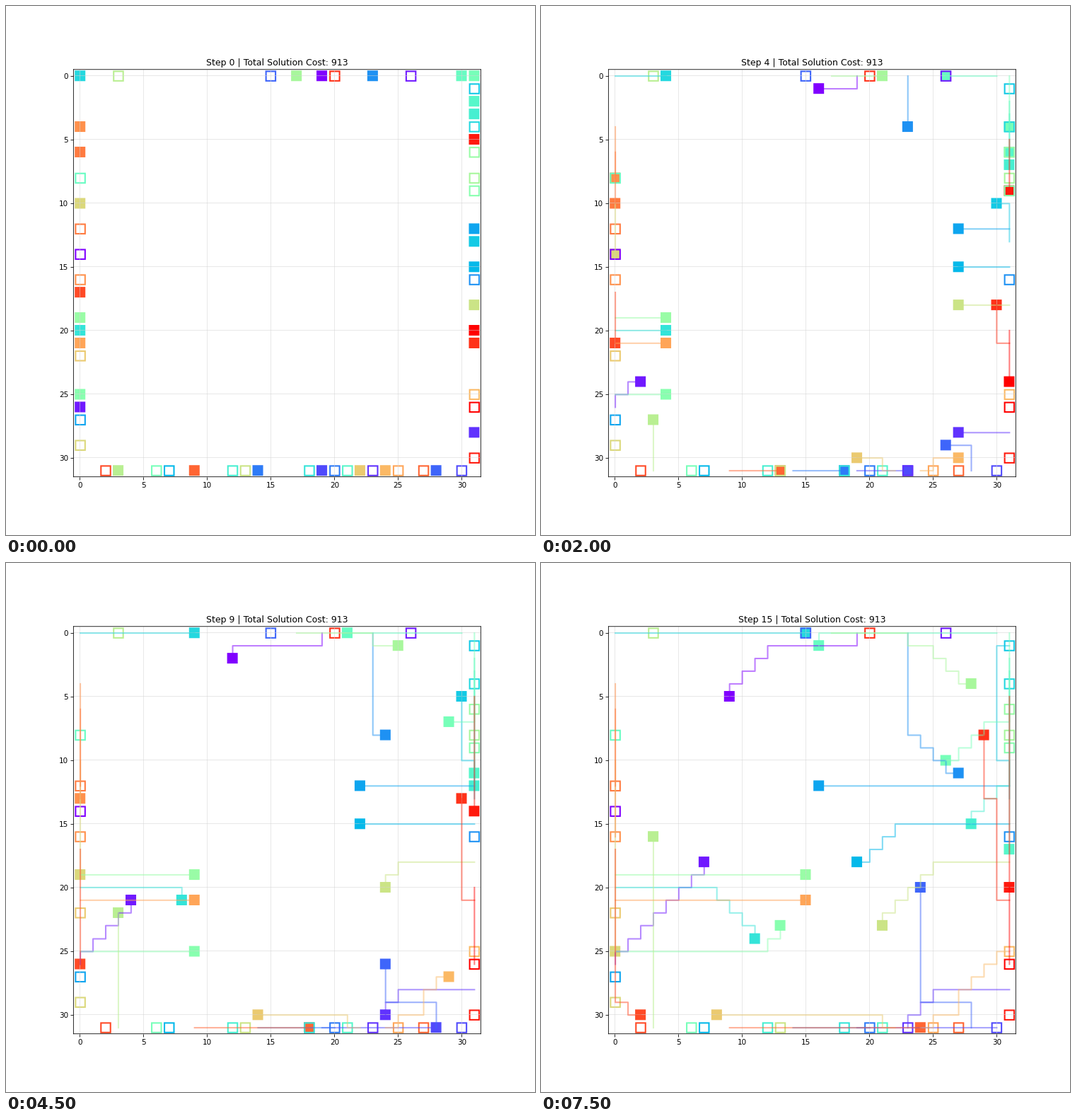
Write a matplotlib script that moves like this. It is 748 px wide and 748 px high and loops after 8000 ms.

```python
import matplotlib.pyplot as plt
import numpy as np
from matplotlib.animation import FuncAnimation
from matplotlib.patches import Rectangle

STEPS = 16
COST = 913
MOVES = {"U": (0, -1), "D": (0, 1), "L": (-1, 0), "R": (1, 0)}

# cell pitch and left/top axes edge on a 1000 unit sheet
PITCH = 770 / 32
EDGE = np.array([127.5, 120])
HALF = 0.5 / PITCH
SIDE = 18 / PITCH

# start cell, goal cell, moves
AGENTS = [
    ((19, 0), (0, 14), "D" + "L" * 7 + "DL" * 3 + "D"),
    ((0, 26), (26, 0), "UR" * 7 + "U"),
    ((31, 28), (23, 31), "L" * 6 + "DL" * 2 + "D"),
    ((19, 31), (30, 31), "R" * 11),
    ((28, 31), (15, 0), "UU" + "L" * 4 + "U" * 9),
    ((14, 31), (20, 31), "R" * 6),
    ((23, 0), (31, 16), "D" * 8 + "RD" * 3 + "R"),
    ((31, 12), (0, 27), "L" * 15),
    ((31, 15), (7, 31), "L" * 9 + "DL" * 3),
    ((31, 13), (31, 1), "UUUL" + "U" * 9 + "R"),
    ((0, 0), (31, 4), "R" * 15),
    ((0, 20), (18, 31), "R" * 8 + "DR" * 3 + "D"),
    ((31, 3), (12, 31), "D" * 9 + "LD" * 3),
    ((31, 2), (21, 31), "D" * 15),
    ((30, 0), (0, 8), "L" * 14 + "D"),
    ((31, 0), (6, 31), "D" * 7 + "LL" + "DL" * 3),
    ((0, 25), (31, 9), "R" * 12 + "URU"),
    ((0, 19), (31, 6), "R" * 15),
    ((17, 0), (31, 8), "R" * 6 + "DRR" + "DR" * 3),
    ((3, 31), (3, 0), "U" * 15),
    ((31, 18), (13, 31), "L" * 6 + "DL" * 4 + "D"),
    ((0, 10), (0, 29), "D" * 15),
    ((22, 31), (0, 22), "LU" + "L" * 13),
    ((24, 31), (31, 25), "RURRU" + "UR" * 4),
    ((0, 21), (25, 31), "R" * 15),
    ((0, 4), (0, 16), "D" * 12),
    ((0, 6), (0, 12), "D" * 6),
    ((9, 31), (27, 31), "R" * 15),
    ((0, 17), (2, 31), "D" * 12 + "RDR"),
    ((31, 21), (20, 0), "L" + "U" * 8 + "L" + "U" * 5),
    ((31, 5), (31, 30), "D" * 15),
    ((31, 20), (31, 26), "D" * 6),
]


def walk(start, moves):
    """Cells visited, one per step."""
    return np.cumsum([start] + [MOVES[m] for m in moves], axis=0)


def snap(cells):
    """Cell centres rounded to whole units of the sheet."""
    units = np.floor((np.asarray(cells) + 0.5) * PITCH + EDGE + 0.5)
    return (units - EDGE) / PITCH - 0.5


def square(center, **style):
    ax.add_patch(Rectangle(center - SIDE / 2, SIDE, SIDE, zorder=1, **style))


paths = [snap(walk(start, moves)) for start, _, moves in AGENTS]
goals = [snap(goal) + HALF for _, goal, _ in AGENTS]
colors = plt.cm.rainbow(np.linspace(0, 1, len(AGENTS)))

plt.rcParams["path.snap"] = False
fig, ax = plt.subplots(figsize=(10, 10), dpi=74.8)


def draw(step):
    ax.clear()
    for path, color in zip(paths, colors):
        # an agent leaves the grid once it has reached its goal
        if step < len(path):
            square(path[step], color=color, lw=1.5)
        trail = path[:step + 1] + HALF
        ax.plot(trail[:, 0], trail[:, 1], color=color, lw=2, alpha=0.5)
    for goal, color in zip(goals, colors):
        square(goal, fill=False, ec=color, lw=2)
    ax.set_xlim(-0.5, 31.5)
    ax.set_ylim(31.5, -0.5)
    ax.set_aspect("equal")
    ax.grid(True, color="lightgray", lw=0.5)
    ax.set_title(f"Step {step} | Total Solution Cost: {COST}")
    return []


anim = FuncAnimation(fig, draw, frames=STEPS, init_func=lambda: [],
                     interval=500, repeat=True, repeat_delay=0)
plt.show()
```
